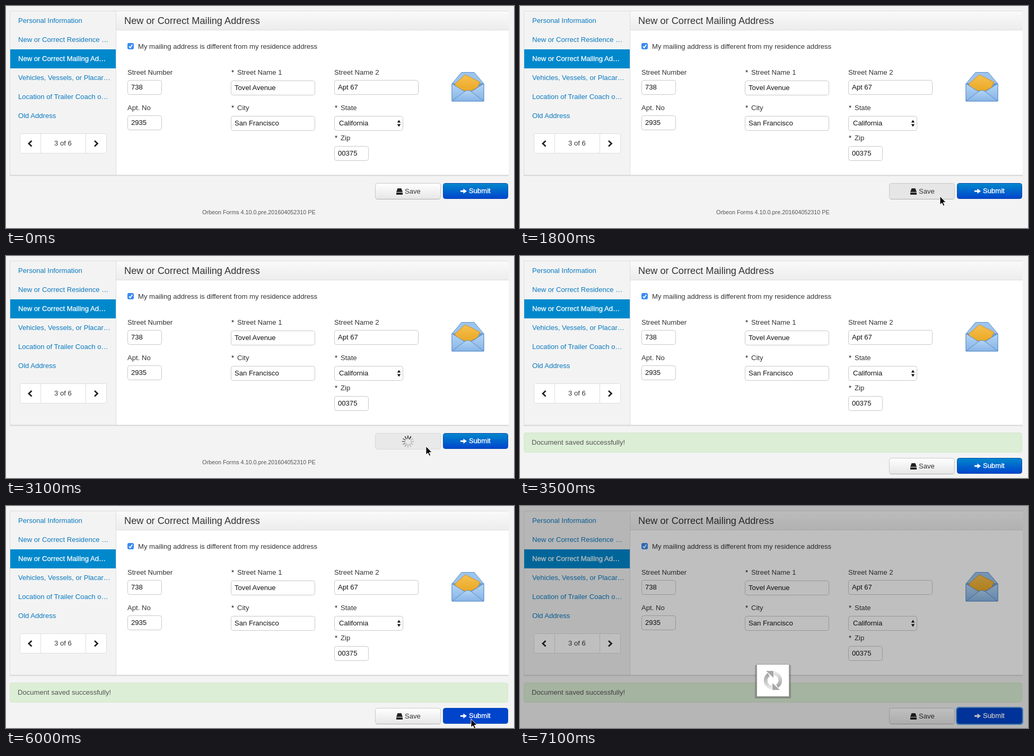
An HTML page that plays this animation: 958x420 px, repeating every 7200 ms.

```html
<!DOCTYPE html>
<html lang="en">
<head>
<meta charset="utf-8">
<title>Mailing address form</title>
<style>
html, body { margin: 0; width: 100%; height: 100%; overflow: hidden; background: #f3f3f3; }
svg { display: block; font: 13.1px "Liberation Sans", Arial, sans-serif; fill: #333; }
.link { fill: #0a7ac0; }
.bold { fill: #fff; stroke: #fff; stroke-width: .3px; }
.value { fill: #111; }
.title { font-size: 18.2px; }
.foot { font-size: 10.8px; fill: #555; }
.box { fill: #fff; stroke: #c8c8c8; }
.line { fill: none; stroke: #ddd; }
.icon { fill: none; stroke: #222; stroke-width: 2.8; }
</style>
</head>
<body>
<svg id="stage" width="958" height="420" viewBox="0 0 958 420">
  <defs>
    <linearGradient id="head" x2="0" y2="1"><stop stop-color="#fafafa"/><stop offset="1" stop-color="#ececec"/></linearGradient>
    <linearGradient id="grey" x2="0" y2="1"><stop stop-color="#fff"/><stop offset="1" stop-color="#e6e6e6"/></linearGradient>
    <linearGradient id="blue" x2="0" y2="1"><stop stop-color="#08c"/><stop offset="1" stop-color="#04c"/></linearGradient>
    <linearGradient id="paper" x2="0" y2="1"><stop stop-color="#f6c050"/><stop offset="1" stop-color="#eaa722"/></linearGradient>
    <linearGradient id="sky" x2="0" y2="1"><stop stop-color="#b5d5f5"/><stop offset="1" stop-color="#86b4e6"/></linearGradient>
    <linearGradient id="arc"><stop stop-color="#e6e6e6"/><stop offset="1" stop-color="#a4a4a4"/></linearGradient>
  </defs>

  <rect width="958" height="420" fill="#f3f3f3"/>
  <rect x="208" y="10" width="740" height="311" fill="#fff"/>
  <rect x="208" y="10" width="740" height="36" fill="url(#head)"/>
  <path class="line" d="M948 9.5H7.5V320M207.5 10V320M208 45.5H948"/>
  <path d="M7 320.5H948" stroke="#d6d6d6" stroke-width="2"/>
  <rect x="8" y="82" width="199" height="36" fill="#08c"/>
  <text class="title" x="223" y="34">New or Correct Mailing Address</text>

  <rect class="box" x="26.5" y="241.5" width="163" height="37" rx="3" style="stroke:#ddd"/>
  <path class="line" d="M65.5 242V278M150.5 242V278"/>
  <path class="icon" d="M48.5 255L43 260.3L48.5 265.6M167 255L172.500 260.300L167 265.600"/>
  <text x="107.500" y="264" text-anchor="middle">3 of 6</text>

  <rect x="229" y="70" width="12" height="12" rx="3" fill="#3a8bf2"/>
  <path d="M232 76.300L234.300 79L238.200 73" fill="none" stroke="#fff" stroke-width="1.800"/>
  <text x="249" y="81">My mailing address is different from my residence address</text>

  <g id="form"></g>
  <path d="M741 215.500L744.200 220.500H737.800ZM741 228.500L744.200 223.500H737.800Z" fill="#111"/>

  <g stroke="#5f90c8" stroke-linejoin="round">
    <path d="M841 147L859 125.500H883L901 147Z" fill="#9cc4ee"/>
    <path d="M841 147H901V180H841Z" fill="#6d9fd8"/>
    <path d="M846 148L866 130L894 144L889 154L872 163L852 156Z" fill="url(#paper)" stroke="#cf9425"/>
    <path d="M841 147L865 162L841 180ZM901 147L877 162L901 180Z" fill="url(#sky)"/>
    <path d="M841 180L866 161Q871 158 876 161L901 180Z" fill="url(#sky)"/>
  </g>

  <g id="banner">
    <rect x="7.500" y="334.500" width="939" height="37" rx="4" fill="#dceed6" stroke="#d3e8c9"/>
    <text x="22" y="357" fill="#555">Document saved successfully!</text>
  </g>

  <g id="actions">
    <rect id="save" x="696.500" y="335.500" width="123" height="30" rx="4" stroke="#c8c8c8"/>
    <path id="saveEdge" d="M699 365.500H817" stroke="#b0b0b0"/>
    <g id="saveLabel">
      <path d="M738.500 345H745.500L748 352H736ZM736 353H748V357H736Z" fill="#222"/>
      <text x="752" y="355">Save</text>
    </g>
    <g id="spokes" transform="translate(758 351)"></g>
    <rect id="ring" x="823.500" y="334.500" width="124" height="31" rx="4" fill="none" stroke="#5aa2f5" stroke-width="3"/>
    <rect id="submit" x="824.500" y="335.500" width="122" height="29" rx="4" stroke="#0a4aad"/>
    <path d="M857 348.800H862.500V345.500L869 350.300L862.500 355.100V351.800H857Z" fill="#fff"/>
    <text class="bold" x="873" y="354">Submit</text>
    <text class="foot" x="370" y="394">Orbeon Forms 4.10.0.pre.201604052310 PE</text>
  </g>

  <g id="mask">
    <rect width="958" height="420" opacity=".25" fill="#000"/>
    <rect x="443" y="301" width="68" height="63" opacity=".2" fill="#000"/>
    <rect x="446.500" y="299.500" width="61" height="61" fill="#fff" stroke="#999"/>
    <g id="wheel"></g>
  </g>
  <path id="cursor" d="M0 0V16L3.700 12.600L6.200 18.300L8.700 17.200L6.200 11.600H11.200Z" fill="#000" stroke="#fff"/>
</svg>
<script>
const $ = id => document.getElementById(id);
const show = (id, on) => $(id).setAttribute("visibility", on ? "visible" : "hidden");
const text = (x, y, s, cls = "") => `<text x="${x}" y="${y}" class="${cls}">${s}</text>`;

// label, value, x, top of box, width, required
const fields = [
  ["Street Number", "738", 229, 140, 65],
  ["Street Name 1", "Tovel Avenue", 424, 141, 159, 1],
  ["Street Name 2", "Apt 67", 619, 140, 159],
  ["Apt. No", "2935", 229, 207, 65],
  ["City", "San Francisco", 424, 208, 159, 1],
  ["State", "California", 619, 208, 130, 1],
  ["Zip", "00375", 619, 265, 65, 1]
];
const links = ["Personal Information", "New or Correct Residence …", "New or Correct Mailing Ad…",
  "Vehicles, Vessels, or Placar…", "Location of Trailer Coach o…", "Old Address"];

$("form").innerHTML = links.map((s, i) => text(23, 32 + 36 * i, s, i == 2 ? "bold" : "link")).join("") +
  fields.map(([label, value, x, y, w, must]) => {
    const base = y > 250 ? 254 : y > 200 ? 197 : 130;
    return (must ? text(x + 1, base, "*", "value") : "") + text(x + (must ? 12 : 0), base, label) +
      `<rect class="box" x="${x + .5}" y="${y + .5}" width="${w - 1}" height="27" rx="4"/>` +
      text(x + (label == "State" ? 9 : 7), y + 18, value, "value");
  }).join("");

$("spokes").innerHTML = Array.from({ length: 12 }, (_, i) =>
  `<path d="M0 -6V-10.500" stroke="#333" stroke-width="2" stroke-linecap="round" transform="rotate(${i * 30})"/>`).join("");

$("wheel").innerHTML = [0, 180].map(a => `<g transform="rotate(${a})">
  <path d="M-13.500 -2A13.500 13.500 0 0 1 11 -8" fill="none" stroke="url(#arc)" stroke-width="7"/>
  <path d="M18 -13V1H5Z" fill="#a8a8a8"/></g>`).join("");

// time, x, y of the pointer
const toSave = [[1300, 806, 424], [1500, 800, 396], [1800, 792, 360], [3200, 792, 360]];
const toSubmit = [[5400, 880, 424], [5700, 877, 403], [6200, 877, 403], [6500, 880, 424]];

function along(path, t) {
  const i = path.findIndex(p => p[0] > t);
  if (i < 1) return null;
  const [a, b] = [path[i - 1], path[i]], k = (t - a[0]) / (b[0] - a[0]);
  return [a[1] + (b[1] - a[1]) * k, a[2] + (b[2] - a[2]) * k];
}

function draw(now) {
  const t = Math.floor(now % 7200 / 100) * 100;
  const saved = t >= 3200, saving = t >= 2000 && !saved, sent = t >= 6100;
  show("banner", saved);
  show("saveLabel", !saving);
  show("saveEdge", !saving);
  show("spokes", saving);
  show("ring", sent);
  show("mask", sent);
  $("actions").setAttribute("transform", `translate(0 ${saved ? 47 : 0})`);
  $("save").setAttribute("fill", saving ? "#e9e9e9" : t >= 1800 && !saved ? "#e6e6e6" : "url(#grey)");
  $("save").setAttribute("stroke", saving ? "#d8d8d8" : "#c8c8c8");
  $("submit").setAttribute("fill", t >= 5700 ? "#04c" : "url(#blue)");

  [...$("spokes").children].forEach((s, i) => {
    const age = (t / 1000 - i / 12 + 10) % 1;
    s.setAttribute("opacity", Math.max(.25, 1 - age / .6 * .75));
  });
  $("wheel").setAttribute("transform", `translate(477 330) rotate(${(t - 6100) * .27 + (t > 6100 ? 0 : 0)})`);

  const p = along(toSave, t) || along(toSubmit, t);
  show("cursor", p);
  if (p) $("cursor").setAttribute("transform", `translate(${p})`);
}

const start = performance.now();
(function tick() {
  draw(performance.now() - start);
  requestAnimationFrame(tick);
})();
</script>
</body>
</html>
```
